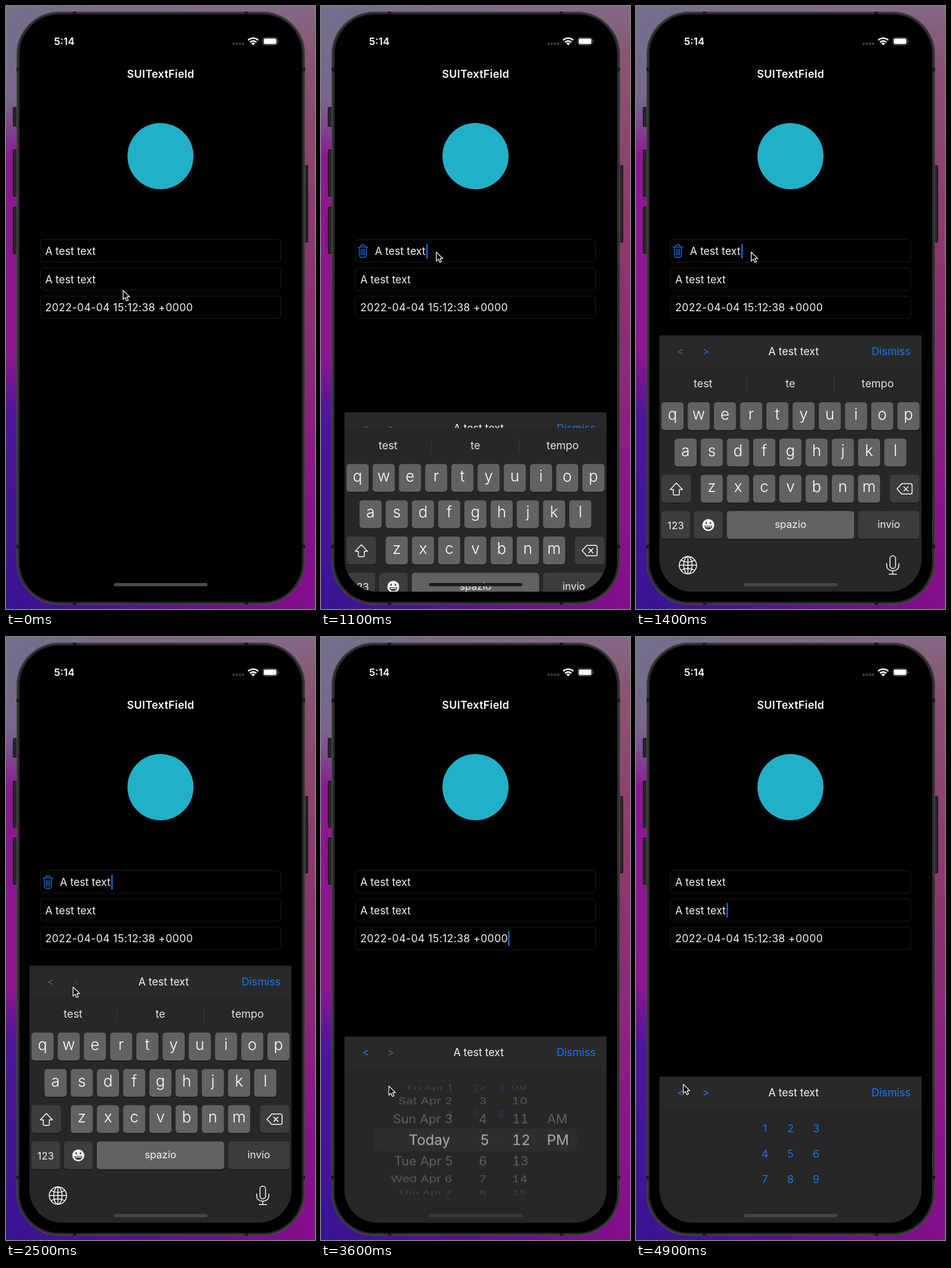
Write an HTML page that moves like this. It is 500 px wide and 974 px high and loops after 5 s.

```html
<!DOCTYPE html>
<html lang="en">
<head>
<meta charset="utf-8">
<title>SUITextField</title>
<style>
html, body { margin: 0; width: 100%; height: 100%; overflow: hidden; background: #000; }
svg { display: block; width: 500px; height: 974px; }
text { font-family: Inter, "Liberation Sans", sans-serif; white-space: pre; }
.loose { letter-spacing: .33px; }
.digits { font-variant-numeric: tabular-nums; }
</style>
</head>
<body>
<svg id="stage" viewBox="0 0 500 974" xmlns="http://www.w3.org/2000/svg">
  <defs>
    <linearGradient id="left" gradientUnits="userSpaceOnUse" x1="0" y1="0" x2="-60" y2="970">
      <stop offset="0" stop-color="#756f8d"/><stop offset=".15" stop-color="#78688d"/>
      <stop offset=".2" stop-color="#7f4690"/><stop offset=".25" stop-color="#8c1793"/>
      <stop offset=".58" stop-color="#8d168f"/><stop offset=".68" stop-color="#4c179a"/>
      <stop offset="1" stop-color="#391592"/>
    </linearGradient>
    <linearGradient id="right" x1="0" y1="0" x2="0" y2="1">
      <stop offset="0" stop-color="#846884"/><stop offset=".1" stop-color="#8a5272"/>
      <stop offset=".35" stop-color="#8e3b6b"/><stop offset=".6" stop-color="#8a2a78"/>
      <stop offset=".8" stop-color="#8c148a"/><stop offset="1" stop-color="#830f8b"/>
    </linearGradient>
    <linearGradient id="across">
      <stop offset=".04" stop-color="#fff" stop-opacity="0"/><stop offset=".96" stop-color="#fff"/>
    </linearGradient>
    <mask id="blend"><rect width="500" height="974" fill="url(#across)"/></mask>
    <clipPath id="screen"><rect x="38" y="30" width="424" height="916" rx="53"/></clipPath>
  </defs>

  <rect width="500" height="974" fill="url(#left)"/>
  <rect width="500" height="974" fill="url(#right)" mask="url(#blend)"/>

  <g fill="#262626" stroke="#151515">
    <rect x="11.5" y="163.5" width="8" height="31" rx="1.5"/>
    <rect x="11.5" y="232.5" width="8" height="75" rx="1.5"/>
    <rect x="11.5" y="324.5" width="8" height="75" rx="1.5"/>
    <rect x="481" y="257.5" width="7.5" height="124" rx="1.5"/>
  </g>
  <rect x="17" y="9" width="467" height="958" rx="69" fill="#2b2b2a"/>
  <rect x="17.8" y="9.8" width="465.4" height="956.4" rx="68" fill="none" stroke="#50504b" stroke-width="1.2"/>
  <path d="M17 102.5h6M478 102.5h6M17 873h6M478 873h6M111 9v6M389 9v6M111 961v6M389 961v6" stroke="#1a1a1a" stroke-width="6"/>
  <rect x="22" y="13.5" width="457" height="949" rx="64" fill="#000"/>

  <g id="status">
    <g fill="#404040"><circle cx="368.5" cy="61" r="2"/><circle cx="373.5" cy="61" r="2"/><circle cx="378.5" cy="61" r="2"/><circle cx="383.5" cy="61" r="2"/></g>
    <g fill="none" stroke="#fff" stroke-width="2.3">
      <path d="M391.8 55.2a11.7 11.7 0 0 1 16.4 0M394.8 58.6a7.5 7.5 0 0 1 10.4 0"/>
    </g>
    <path d="M396.9 60.4a4.5 4.5 0 0 1 6.2 0L400 63.6Z" fill="#fff"/>
    <rect x="415.5" y="51" width="23.5" height="12" rx="3.6" fill="none" stroke="#686868"/>
    <rect x="417" y="52.5" width="20.5" height="9" rx="2.3" fill="#fff"/>
    <path d="M440.2 55.2q2.6 1.8 0 3.6Z" fill="#686868"/>
  </g>
  <circle cx="250" cy="242.5" r="53.5" fill="#22b0c8"/>

  <g id="fields"></g>
  <g id="trash" fill="none" stroke="#1769db" stroke-width="1.4" stroke-linecap="round" stroke-linejoin="round">
    <path d="M59.8 389.4h16M64.6 389v-1.6q0-1.6 1.6-1.6h3.2q1.6 0 1.6 1.6V389M61.6 389.8l.9 14.2q.1 1.8 1.9 1.8h6.8q1.8 0 1.9-1.8l.9-14.2M65 393l.3 9.2M67.8 393v9.2M70.6 393l-.3 9.2"/>
  </g>
  <rect id="caret" width="2.2" height="24" rx="1" fill="#1a6fe6"/>

  <g clip-path="url(#screen)">
    <rect id="panel" x="38" width="424" height="500" fill="#272727"/>
    <g id="bar"><rect x="38" width="424" height="49" fill="#292929"/></g>
    <g id="keys"><rect x="38" y="581" width="424" height="420" fill="#272727"/></g>
    <g id="pad"></g>
    <g id="picker"></g>
  </g>
  <rect id="home" x="174.5" y="932" width="151.5" height="5.2" rx="2.6"/>
  <path id="cursor" d="M0 0V14.6L3.5 11.4 5.8 16.8 8.4 15.7 6.1 10.4H10.6Z" fill="#000" stroke="#fff" stroke-width="1.2" stroke-linejoin="round"/>
</svg>

<script>
const LOOP = 5000, STEP = 100;
const BLUE = '#1a76ec', GREY = '#5e5e5e', PRESSED = '#1e4878', WHITE = '#f4f4f4';
const $ = id => document.getElementById(id);

function add(parent, tag, attrs) {
  const el = document.createElementNS('http://www.w3.org/2000/svg', tag);
  for (const k in attrs) el.setAttribute(k, attrs[k]);
  parent.appendChild(el);
  return el;
}
function label(parent, text, x, y, size, fill, anchor = 'middle', weight = 400) {
  const el = add(parent, 'text', { x, y, 'font-size': size, fill, 'text-anchor': anchor, 'font-weight': weight });
  el.textContent = text;
  return el;
}
const move = (el, x, y) => el.setAttribute('transform', `translate(${x} ${y})`);
const clamp = v => Math.max(0, Math.min(1, v));

// Static texts and fields
label($('status'), '5:14', 94.3, 63, 16.4, '#fff', 'middle', 600);
label($('status'), 'SUITextField', 250.2, 116, 17.3, '#fff', 'middle', 600).classList.add('loose');
const fieldText = ['A test text', 'A test text', '2022-04-04 15:12:38 +0000'].map((s, i) => {
  const y = 377.5 + i * 45.5;
  add($('fields'), 'rect', { x: 55.5, y, width: 389, height: 36.2, rx: 5, fill: 'none', stroke: '#1b1b1b' });
  return label($('fields'), s, 63.5, y + 24.8, 17.1, WHITE, 'start');
});
fieldText[2].classList.add('loose');

// Toolbar, relative to the panel top
const back = label($('bar'), '<', 72, 31.8, 17, BLUE);
const next = label($('bar'), '>', 113, 31.8, 17, BLUE);
label($('bar'), 'A test text', 255, 31.8, 17.1, WHITE);
label($('bar'), 'Dismiss', 444.5, 31.8, 17.3, BLUE, 'end');

// Keyboard
const keys = $('keys');
function key(x, y, w, fill) {
  add(keys, 'rect', { x, y: y + 1.2, width: w, height: 45, rx: 5, fill: '#161616' });
  add(keys, 'rect', { x, y, width: w, height: 45, rx: 5, fill });
}
['test', 'te', 'tempo'].forEach((s, i) => label(keys, s, 108.5 + i * 141.3, 615, 17.4, '#e2e2e2'));
[179, 320.5].forEach(x => add(keys, 'rect', { x: x - .5, y: 597, width: 1, height: 25, fill: '#3b3b3b' }));
[['qwertyuiop', 41.2, 639], ['asdfghjkl', 62.3, 697.7], ['zxcvbnm', 104.7, 756.2]].forEach(([row, x0, y]) =>
  [...row].forEach((c, i) => {
    const x = x0 + i * 42.42;
    key(x, y, 35.8, '#626262');
    label(keys, c, x + 17.9, y + 28, 25, '#fff', 'middle', 300);
  }));
const DARK = '#3d3d3d';
key(41.2, 756.2, 47.8, DARK);
key(411, 756.2, 47.8, DARK);
key(41.2, 814.8, 46.4, DARK);
key(94, 814.8, 46.4, DARK);
key(147, 814.8, 206, '#626262');
key(359.4, 814.8, 99.4, DARK);
label(keys, '123', 64.3, 843.6, 16.5, '#f0f0f0');
label(keys, 'spazio', 250, 842.4, 16.5, '#f0f0f0');
label(keys, 'invio', 409, 842.4, 16.5, '#f0f0f0');
const line = { fill: 'none', stroke: '#f2f2f2', 'stroke-width': 1.5, 'stroke-linejoin': 'round', 'stroke-linecap': 'round' };
const draw = d => add(keys, 'path', { ...line, d });
draw('M65.3 769.5L75.2 780H70.2V787.5Q70.2 788.8 69 788.8H61.6Q60.4 788.8 60.4 787.5V780H55.4Z');
draw('M430 770.5H444.2Q446.7 770.5 446.7 773V784.8Q446.7 787.3 444.2 787.3H430L422.4 779Z');
draw('M433.4 775.6L440.2 782.4M440.2 775.6L433.4 782.4');
add(keys, 'circle', { cx: 117, cy: 837.4, r: 9.7, fill: '#f4f4f4' });
[113.6, 120.4].forEach(cx => add(keys, 'ellipse', { cx, cy: 834, rx: 1.3, ry: 1.8, fill: DARK }));
add(keys, 'path', { d: 'M110.6 838.4H123.4Q122.6 844.4 117 844.4T110.6 838.4Z', fill: DARK });
add(keys, 'path', { d: 'M112.2 839.4H121.8V840.8H112.2Z', fill: '#f4f4f4' });
add(keys, 'circle', { ...line, cx: 84, cy: 902.3, r: 14 });
add(keys, 'ellipse', { ...line, cx: 84, cy: 902.3, rx: 6.8, ry: 14 });
draw('M84 888.3V916.3M70 902.3H98M72.8 894.2Q84 900 95.2 894.2M72.8 910.4Q84 904.6 95.2 910.4');
add(keys, 'rect', { ...line, x: 411, y: 887, width: 9, height: 20.5, rx: 4.5 });
draw('M405.6 899.5V902Q405.6 911.2 415.5 911.2T425.4 902V899.5M415.5 911.2V916.8M409.5 916.8H421.5');

// Number pad, relative to the panel top
for (let n = 0; n < 9; n++)
  label($('pad'), n + 1, 208.6 + (n % 3) * 41.4, 89.8 + Math.floor(n / 3) * 41.3, 17.3, BLUE);

// Date wheel, relative to the panel top
const wheel = $('picker');
add(wheel, 'rect', { x: 86, y: 148, width: 328, height: 37.5, rx: 8, fill: '#323232' });
const days = ['Thu Mar 31', 'Fri Apr 1', 'Sat Apr 2', 'Sun Apr 3', 'Today', 'Tue Apr 5', 'Wed Apr 6', 'Thu Apr 7', 'Fri Apr 8'];
// distance from centre: [offset, size, vertical squash, colour]
const tilt = [[0, 23.2, 1, '#dadada'], [34, 20.6, .95, '#767676'], [63, 20, .74, '#6a6a6a'], [84.6, 19, .45, '#505050'], [95.5, 18, .2, '#393939']];
days.forEach((day, i) => {
  const d = i - 4, k = Math.abs(d);
  const [off, size, squash, fill] = tilt[k];
  const row = add(wheel, 'g', { transform: `translate(0 ${167 + Math.sign(d) * off}) scale(1 ${squash})` });
  const put = (s, x, anchor) => label(row, s, x, size * .363, size, fill, anchor);
  put(day, k ? 213 - k * k * .12 : 209, 'end');
  put(i + 1, k ? 262 : 265).classList.add('digits');
  put(String(i + 8).padStart(2, '0'), k ? 323.5 - k : 324).classList.add('digits');
  if (d === -1) put('AM', 382.5);
  if (d === 0) put('PM', 383.3);
});

// Motion
const focus = [
  { at: 967, field: 0, view: 'keys', top: 531 },
  { at: 2560, field: 1, view: 'pad', top: 710 },
  { at: 3450, field: 2, view: 'picker', top: 625 },
  { at: 4300, field: 1, view: 'pad', top: 710 }
];
const carets = [[170.4, 384], [146.6, 429.5], [302.8, 475]];
const path = [[0, 189.5, 459.5], [300, 189.5, 459.5], [800, 186.5, 397.5], [1600, 186.5, 397.5], [2300, 108.5, 565.5],
  [2600, 108.5, 565.5], [3000, 116.5, 712.5], [3250, 112, 732], [3500, 112, 732], [4100, 82.5, 643.5],
  [4200, 74, 646], [4300, 74, 646], [4700, 76, 721], [4900, 76.5, 722.5], [5000, 76.5, 722.5]];
const presses = [[2400, 2600, next], [3300, 3500, next], [4200, 4300, back]];

// Share of the distance left in a critically damped spring
const left = age => { const x = .01826 * Math.max(0, age); return (1 + x) * Math.exp(-x); };

function pointer(t) {
  const i = path.findIndex(p => p[0] > t), [a, x, y] = path[i - 1], [b, u, v] = path[i];
  const p = (t - a) / (b - a), e = p * p * (3 - 2 * p);
  return [x + (u - x) * e, y + (v - y) * e];
}

function render(t) {
  const n = focus.filter(f => f.at <= t).length - 1;
  const now = focus[n], prev = focus[n - 1];
  const age = now ? t - now.at : 0;
  const shown = el => (el.style.display = now ? '' : 'none');
  ['panel', 'bar', 'caret'].forEach(id => shown($(id)));

  const inFirst = now && now.field === 0;
  $('trash').style.display = inFirst ? '' : 'none';
  fieldText[0].setAttribute('x', inFirst ? 87.3 : 63.5);

  const top = now ? now.top + ((prev ? prev.top : 946) - now.top) * left(age) : 946;
  $('panel').setAttribute('y', top);
  move($('bar'), 0, top);

  const fade = prev ? clamp(age / 200) : 1;
  const slide = now && !prev ? 365 * left(age + 7) : top - 531;
  ['keys', 'pad', 'picker'].forEach(id => {
    const on = now && now.view === id, off = prev && prev.view === id;
    const alpha = on ? fade : off ? 1 - fade : 0;
    $(id).style.display = alpha ? '' : 'none';
    $(id).style.opacity = alpha;
    move($(id), 0, id === 'keys' ? slide : top);
  });

  if (now) {
    const [x, y] = carets[now.field];
    move($('caret'), x, y);
    $('caret').style.opacity = age % 1000 < 660 ? 1 : 0;
    back.setAttribute('fill', now.field === 0 ? GREY : BLUE);
    next.setAttribute('fill', now.field === 2 ? GREY : BLUE);
    presses.forEach(([a, b, el]) => { if (t >= a && t < b) el.setAttribute('fill', PRESSED); });
  }
  $('home').setAttribute('fill', !now ? '#4c4c4c' : inFirst && slide > 40 ? '#1c1c1c' : now.view === 'picker' ? '#3a3a3a' : '#464646');
  move($('cursor'), ...pointer(t));
}

let start;
function tick(time) {
  if (start === undefined) start = time;
  render(Math.floor(((time - start) % LOOP) / STEP) * STEP);
  requestAnimationFrame(tick);
}
render(0);
requestAnimationFrame(tick);
</script>
</body>
</html>
```
